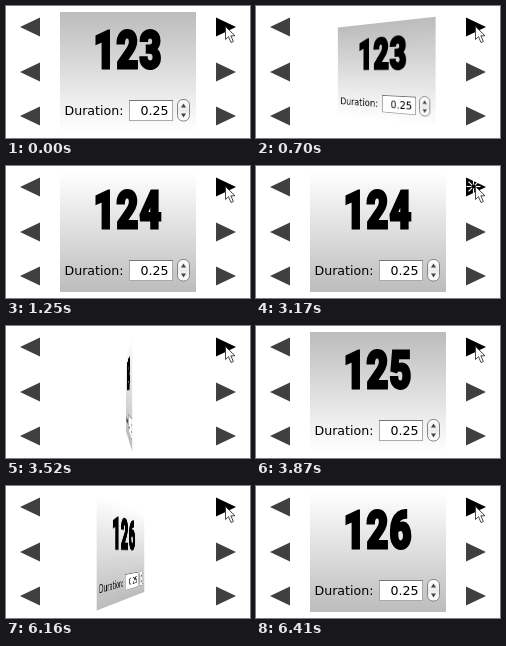
An HTML page for the animation above (8 s loop, 244 px wide and 132 px high).

```html
<!DOCTYPE html>
<html lang="en">
<head>
<meta charset="utf-8">
<title>Flip counter</title>
<style>
  html, body { margin: 0; width: 100%; height: 100%; overflow: hidden; background: #fff; }
  #stage { position: relative; width: 244px; height: 132px; overflow: hidden; }
  #stage > * { position: absolute; left: 0; top: 0; }
  #card { left: 54px; top: 6px; width: 136px; height: 120px; }
  svg { display: block; }
  #count {
    font: 900 52px Impact, Roboto, Inter, sans-serif;
    letter-spacing: 1.5px; stroke: #000; stroke-width: 3px;
  }
  .label { font: 12.6px "Lucida Grande", "DejaVu Sans", sans-serif; }
</style>
</head>
<body>
<div id="stage">
  <svg id="arrows" width="244" height="132" fill="#404040"></svg>
  <div id="card">
    <svg width="136" height="120">
      <defs>
        <linearGradient id="odd" x2="0" y2="1">
          <stop offset="0" stop-color="#bcbcbc"/>
          <stop offset="1" stop-color="#fff"/>
        </linearGradient>
        <linearGradient id="even" x2="0" y2="1">
          <stop offset="0" stop-color="#fff"/>
          <stop offset="1" stop-color="#bcbcbc"/>
        </linearGradient>
        <linearGradient id="knob" x2="0" y2="1">
          <stop offset="0" stop-color="#fff"/>
          <stop offset=".5" stop-color="#ececec"/>
          <stop offset="1" stop-color="#fff"/>
        </linearGradient>
      </defs>
      <rect id="face" width="136" height="120"/>
      <text id="count" text-anchor="middle" transform="translate(68 55.5) scale(.725 1)">123</text>
      <text class="label" x="4.5" y="103">Duration:</text>
      <rect x="69.5" y="88.5" width="43" height="20" fill="#fff" stroke="#aaa"/>
      <path d="M69 88.5H113" stroke="#777"/>
      <text class="label" x="108.5" y="103" text-anchor="end">0.25</text>
      <rect x="117.5" y="87.5" width="12" height="21.5" rx="5.5" fill="url(#knob)" stroke="#858585"/>
      <path d="M121 95.5l2.5-4 2.5 4zM121 101.5l2.5 4 2.5-4z" fill="#444"/>
    </svg>
  </div>
  <svg id="pointer" width="244" height="132">
    <g id="burst" stroke="#fff" stroke-width="1.1"></g>
    <path d="M219.5 20.5v13l3-2.8 2.5 5.8 2.4-1-2.5-5.7h4.1z" fill="#fff" stroke="#333" stroke-width=".9"/>
  </svg>
</div>
<script>
const LOOP = 8000, STEP = 50, FLIP_STEPS = 11;
const DEPTH = 260, PUSH = 70;
const flips = [
  { press: 500, start: 700 },
  { press: 3170, start: 3320 },
  { press: 5860, start: 5860 }
];

const $ = id => document.getElementById(id);
const card = $('card'), face = $('face'), count = $('count'), burst = $('burst');

$('arrows').innerHTML = [21, 66, 110].map((y, i) =>
  `<path d="M14 ${y}l20 -9.5v19z"/>` +
  `<path d="M230 ${y}l-20 -9.5v19z" fill="${i ? '#404040' : '#000'}"/>`).join('');

function pose(angle) {
  const rad = angle * Math.PI / 180;
  const push = PUSH * Math.sin(rad) ** 0.3;
  const shift = 4 * Math.sin(2 * rad);
  // past edge-on, the new face swings in from the other side
  const turn = angle < 90 ? -angle : 180 - angle;
  return `translateX(${shift}px) perspective(${DEPTH}px) translateZ(${-push}px) rotateY(${turn}deg)`;
}

function drawBurst(radius) {
  let rays = '';
  for (let i = 0; i < 8; i++) {
    const a = i * Math.PI / 4, c = Math.cos(a), s = Math.sin(a);
    rays += `<path d="M${217.5 + 2 * c} ${20.5 + 2 * s}L${217.5 + radius * c} ${20.5 + radius * s}"/>`;
  }
  burst.innerHTML = rays;
}

function draw(t) {
  let value = 123, transform = 'none', radius = 0;
  for (const { press, start } of flips) {
    if (t >= press && t < start) radius = 7 + (t - press) / STEP;
    if (t < start) continue;
    const step = Math.floor((t - start) / STEP);
    const angle = step < FLIP_STEPS ? 30 + 14.2 * step : 180;
    if (angle < 180) transform = pose(angle);
    if (angle >= 90) value++;
  }
  count.textContent = value;
  face.setAttribute('fill', value % 2 ? 'url(#odd)' : 'url(#even)');
  card.style.transform = transform;
  burst.style.display = radius ? '' : 'none';
  if (radius) drawBurst(radius);
}

const origin = performance.now();
function tick() {
  draw((performance.now() - origin) % LOOP);
  requestAnimationFrame(tick);
}
tick();
</script>
</body>
</html>
```
